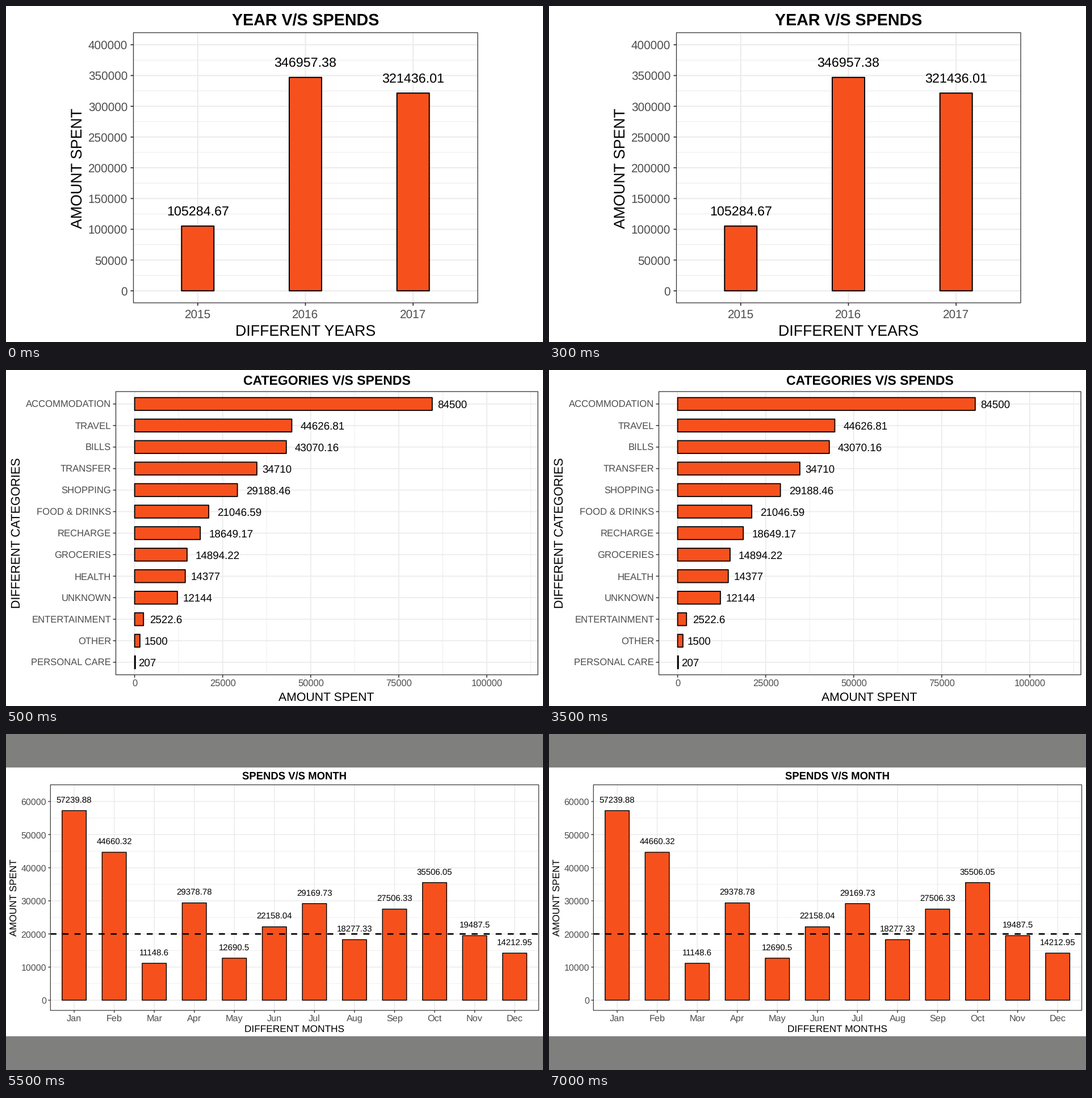
A matplotlib script for the animation above (8 s loop, 946 by 592 pixels).

```python
import matplotlib.pyplot as plt
from matplotlib.animation import FuncAnimation
from matplotlib.patches import Rectangle

W, H, DPI = 946, 592, 64
ORANGE, GRID, DARK, TICK, GREY = "#F6511D", "#EBEBEB", "#333333", "#4D4D4D", "#7F7F7D"

plt.rcParams["font.family"] = "Liberation Sans"
plt.rcParams["text.hinting"] = "none"

fig = plt.figure(figsize=(W / DPI, H / DPI), dpi=DPI, facecolor="white")


def pt(px):
    return px * 72 / DPI


class Chart:
    """A bar chart laid out in stage pixels, y pointing down."""

    def __init__(self, left, top, right, bottom, grid=2.0, back="white"):
        self.box = left, top, right, bottom
        self.grid = grid
        self.ax = fig.add_axes([0, 0, 1, 1])
        self.ax.set(xlim=(0, W), ylim=(H, 0))
        self.ax.axis("off")
        self.rect(-1, -1, W + 1, H + 1, back, z=0)

    def rect(self, x0, y0, x1, y1, fill, edge="none", lw=0.0, z=3):
        self.ax.add_patch(Rectangle((x0, y0), x1 - x0, y1 - y0, facecolor=fill,
                                    edgecolor=edge, lw=pt(lw), zorder=z,
                                    joinstyle="round", snap=False))

    def line(self, xs, ys, color, lw, z=1, **style):
        self.ax.plot(xs, ys, color=color, lw=pt(lw), zorder=z, snap=False,
                     solid_capstyle="butt", dash_capstyle="butt", **style)

    def text(self, x, y, s, size, color="black", ha="center", bold=False):
        self.ax.text(x, y + 0.35 * size, s, fontsize=pt(size), color=color, ha=ha,
                     va="baseline", weight="bold" if bold else "normal", zorder=6)

    def side_text(self, x, y, s, size):
        self.ax.text(x + 0.35 * size, y, s, fontsize=pt(size), rotation=90, ha="center",
                     va="baseline", rotation_mode="anchor", zorder=6)

    def hgrid(self, y, major=True):
        self.line([self.box[0], self.box[2]], [y, y], GRID, self.grid if major else self.grid / 2)

    def vgrid(self, x, major=True):
        self.line([x, x], [self.box[1], self.box[3]], GRID, self.grid if major else self.grid / 2)

    def ytick(self, y, s, size, gap, length=5):
        x = self.box[0]
        self.line([x - length, x], [y, y], DARK, self.grid * 0.9)
        self.text(x - gap, y + 0.5, s, size, TICK, ha="right")

    def xtick(self, x, s, size, gap, length=5):
        y = self.box[3]
        self.line([x, x], [y, y + length], DARK, self.grid * 0.9)
        self.text(x, y + gap, s, size, TICK)

    def border(self, lw):
        x0, y0, x1, y1 = self.box
        self.rect(x0, y0, x1, y1, "none", DARK, lw, z=5)


def years_chart():
    c = Chart(224.5, 47, 831, 523)
    zero, unit = 501.8, 433.5 / 400000
    for k in range(9):
        y = zero - k * 50000 * unit
        if k < 8:
            c.hgrid(y - 25000 * unit, major=False)
        c.hgrid(y)
        c.ytick(y, str(k * 50000), 20.7, 10.3)
    for i, value in enumerate((105284.67, 346957.38, 321436.01)):
        x, top = 337.8 + 189.7 * i, zero - value * unit
        c.vgrid(x)
        c.xtick(x, str(2015 + i), 20.7, 19.5)
        c.rect(x - 28.5, top, x + 28.5, zero, ORANGE, "black", 2)
        c.text(x, top - 27.3, str(value), 23.3)
    c.border(1.3)
    c.text(527.7, 23, "YEAR V/S SPENDS", 28.6, bold=True)
    c.text(527.7, 572, "DIFFERENT YEARS", 26.7)
    c.side_text(125, 285.5, "AMOUNT SPENT", 26.7)
    return c.ax


def categories_chart():
    c = Chart(193.5, 38, 937, 537, grid=1.7)
    zero, unit = 226.6, 155.1 / 25000
    for k in range(5):
        x = zero + k * 25000 * unit
        c.vgrid(x + 12500 * unit, major=False)
        c.vgrid(x)
        c.xtick(x, str(k * 25000), 16.5, 15.5)
    spends = {
        "ACCOMMODATION": 84500, "TRAVEL": 44626.81, "BILLS": 43070.16,
        "TRANSFER": 34710, "SHOPPING": 29188.46, "FOOD & DRINKS": 21046.59,
        "RECHARGE": 18649.17, "GROCERIES": 14894.22, "HEALTH": 14377,
        "UNKNOWN": 12144, "ENTERTAINMENT": 2522.6, "OTHER": 1500,
        "PERSONAL CARE": 207,
    }
    size = 18.7
    for i, (name, value) in enumerate(spends.items()):
        y, end, label = 59.9 + 37.92 * i, zero + value * unit, str(value)
        c.hgrid(y)
        c.ytick(y, name, 16.65, 8.4)
        c.rect(zero, y - 11.3, end, y + 11.3, ORANGE, "black", 1.8)
        # labels sit a fifth of their own width past the bar
        advance = size * (0.556 * len(label) - 0.278 * label.count("."))
        c.text(end + 0.2 * advance - 0.7, y + 0.5, label, size, ha="left")
    c.border(1.3)
    c.text(565, 18.2, "CATEGORIES V/S SPENDS", 23, bold=True)
    c.text(564.7, 575.8, "AMOUNT SPENT", 21.3)
    c.side_text(17.2, 286.8, "DIFFERENT CATEGORIES", 21.5)
    return c.ax


def months_chart():
    c = Chart(78.3, 89.5, 938.5, 487, grid=1.5, back=GREY)
    c.rect(-1, 59, W + 1, 532.5, "white", z=0.5)
    zero, unit = 469, 350.1 / 60000
    for k in range(7):
        y = zero - k * 10000 * unit
        c.hgrid(y - 5000 * unit, major=False)
        c.hgrid(y)
        c.ytick(y, str(k * 10000), 16, 7.2, length=4)
    names = "Jan Feb Mar Apr May Jun Jul Aug Sep Oct Nov Dec".split()
    values = (57239.88, 44660.32, 11148.6, 29378.78, 12690.5, 22158.04,
              29169.73, 18277.33, 27506.33, 35506.05, 19487.5, 14212.95)
    for i, (name, value) in enumerate(zip(names, values)):
        x, top = 120.1 + 70.55 * i, zero - value * unit
        c.vgrid(x)
        c.xtick(x, name, 16.2, 13.2, length=4)
        c.rect(x - 21.3, top, x + 21.3, zero, ORANGE, "black", 1.4)
        c.text(x, top - 19.7, str(value), 15.05)
    level = zero - 20000 * unit
    c.line([c.box[0], c.box[2]], [level, level], "black", 2.65, z=4,
           linestyle=(0, (4, 4)))
    c.border(1.2)
    c.text(508.2, 74.2, "SPENDS V/S MONTH", 18.5, bold=True)
    c.text(508.2, 519.9, "DIFFERENT MONTHS", 17.2)
    c.side_text(14.2, 288.2, "AMOUNT SPENT", 17.1)
    return c.ax


STEP = 500
charts = [years_chart(), categories_chart(), months_chart()]
starts = [0, 500, 5500]


def show(frame):
    now = sum(frame * STEP >= t for t in starts) - 1
    for i, ax in enumerate(charts):
        ax.set_visible(i == now)
    return charts


anim = FuncAnimation(fig, show, frames=16, init_func=lambda: show(0), interval=STEP,
                     repeat=True, repeat_delay=0, blit=False)
plt.show()
```
